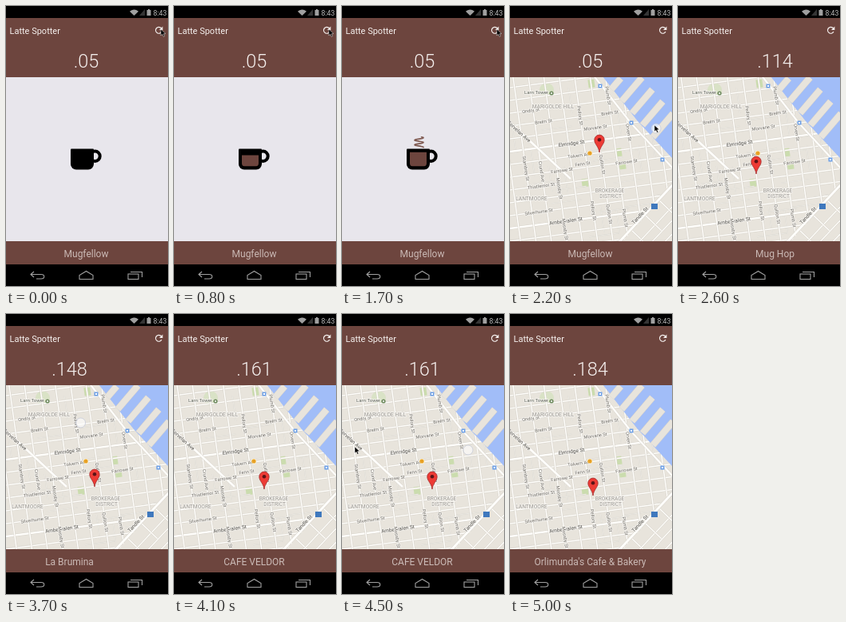
An HTML page with a canvas for the animation above (5.1 s loop, 203 by 350 pixels).

```html
<!DOCTYPE html>
<html lang="en">
<head>
<meta charset="utf-8">
<title>Coffee search</title>
<style>
html, body { margin: 0; width: 100%; height: 100%; overflow: hidden; background: #000; }
canvas { display: block; width: 203px; height: 350px; }
</style>
</head>
<body>
<canvas id="stage" width="203" height="350"></canvas>
<script>
const ctx = document.getElementById('stage').getContext('2d');
const LOOP = 5100, STEP = 100, W = 203;
const MAP_TOP = 89, MAP_BOTTOM = 294, NAV_TOP = 323;
const BROWN = '#6d453e', LAND = '#e8e4dc', PARK = '#cbdcae', GRAY = '#a0a0a0';
const MAP_AT = 1900, SLIDE_MS = 400, PRESS_MS = 100, APPROACH_MS = 200;

const shops = [
  { miles: '.05', name: 'Mugfellow', pin: [112, 183] },
  { miles: '.114', name: 'Mug Hop', pin: [98, 210] },
  { miles: '.148', name: 'La Brumina', pin: [111, 216] },
  { miles: '.161', name: 'CAFE VELDOR', pin: [113, 219] },
  { miles: '.184', name: "Orlimunda's Cafe & Bakery", pin: [104, 227] }
];

// The finger presses at (x, y) shortly before the page starts to slide.
const swipes = [
  { at: 2300, x: 183, y: 153 },
  { at: 3201, x: 156, y: 122 },
  { at: 3600, x: 123, y: 136 },
  { at: 4500, x: 158, y: 170 }
];

// One entry per grid line, with the places along it that carry its name.
const rowNames = [
  ['Ondry St', 26], ['Brelm St', 42, 125], ['Morvane St', 107], ['Elmridge St', 77],
  ['Tolvern Ave', 87], ['Farrowe St', 65, 146], ['Thistlemor St', 39], [],
  ['Silverhume St', 36], ['Ambervalen St', 70]
];
const columnNames = [
  ['Stambrey St', 203], ['Crund Ave', 207], ['Mossby St', 228, 279], [],
  ['Pellory St', 137, 256], ['Quillon St', 198, 260], ['Plumb St', 112, 265],
  ['Orven St', 158]
];

const clamp = v => Math.max(0, Math.min(1, v));
const mix = (a, b, k) => a + (b - a) * k;
const ease = v => { v = clamp(v); return v ** 3 * (10 - 15 * v + 6 * v * v); };

const rowY = (row, x) => 134 + 16 * row - 0.13 * x;
const columnX = (col, y) => 18 + 19.3 * col + 0.14 * (y - 190);

function seeded(seed) {
  return () => (seed = seed * 16807 % 2147483647) / 2147483647;
}

function box(color, x, y, w, h) {
  ctx.fillStyle = color;
  ctx.fillRect(x, y, w, h);
}

function trace(points) {
  ctx.beginPath();
  points.forEach(([x, y]) => ctx.lineTo(x, y));
}

function stroke(points, color, width) {
  trace(points);
  ctx.strokeStyle = color;
  ctx.lineWidth = width;
  ctx.stroke();
}

function shape(points, color) {
  trace(points);
  ctx.closePath();
  ctx.fillStyle = color;
  ctx.fill();
}

function disc(x, y, r, color) {
  ctx.beginPath();
  ctx.arc(x, y, r, 0, Math.PI * 2);
  ctx.fillStyle = color;
  ctx.fill();
}

function write(text, x, y, size, color, align = 'center', weight = 400) {
  ctx.font = `${weight} ${size}px Roboto, sans-serif`;
  ctx.textAlign = align;
  ctx.fillStyle = color;
  ctx.fillText(text, x, y);
}

function label(text, x, y, degrees, size = 5.8, color = '#6c6963') {
  ctx.save();
  ctx.translate(x, y);
  ctx.rotate(degrees * Math.PI / 180);
  ctx.font = `${size}px Roboto, sans-serif`;
  ctx.textAlign = 'center';
  ctx.lineWidth = 1.6;
  ctx.lineJoin = 'round';
  ctx.strokeStyle = '#f7f5f1';
  ctx.strokeText(text, 0, 2);
  ctx.fillStyle = color;
  ctx.fillText(text, 0, 2);
  ctx.restore();
}

function road(points, width) {
  stroke(points, '#d6d2ca', width + 0.9);
  stroke(points, '#fffefb', width);
}

const across = (row, x1 = -5, x2 = 210) => [[x1, rowY(row, x1)], [x2, rowY(row, x2)]];
const down = (col, y1 = 85, y2 = 300) => [[columnX(col, y1), y1], [columnX(col, y2), y2]];

function drawStreets() {
  const random = seeded(11);
  for (let i = 0; i < 22; i++) {
    const row = i / 2 + 0.5 * random(), x = 180 * random(), y = mix(100, 270, random());
    road(across(row, x, x + 38), 0.5);
    road(down(i / 2 - 0.5, y, y + 32), 0.5);
  }
  for (let row = -3; row < 13; row++) road(across(row), row === 3 || row === 9 ? 2.4 : 1.5);
  for (let col = -2; col < 10; col++) road(down(col), 1.5);
  road([[-5, 141], [76, 216]], 2.6);
}

function drawParks() {
  [[102, 97], [136, 183], [141, 199], [94, 221]].forEach(([x, y]) => {
    ctx.save();
    ctx.translate(x, y);
    ctx.rotate(-0.14);
    box(PARK, -4, -5, 8, 10);
    ctx.restore();
  });
  disc(46, 105, 9, '#d9e2c6');
}

function drawSouthEast() {
  shape([[136, 300], [208, 221], [208, 300]], LAND);
  for (let i = 0; i < 4; i++) {
    road([[153 + i * 17, 281 - i * 19], [173 + i * 17, 300 - i * 19]], 1.4);
    road([[157 + i * 16, 300], [208, 246 + i * 17]], 1.3);
  }
  road([[132, 300], [208, 219]], 3);
}

function drawWaterfront() {
  shape([[116, 88], [160, 144], [204, 191], [204, 88]], '#a1bdf8');
  for (let i = 0; i < 5; i++) {
    const x = 127 + 13 * i, y = 104 + 15 * i, length = i ? 39 : 18;
    const pier = [[x, y], [x + length * 0.65, y - length * 0.76]];
    stroke(pier, '#cfcdca', 8.8);
    stroke(pier, LAND, 8);
  }
  road([[104, 86], [152, 147], [208, 207]], 2.4);
  for (let i = 0; i < 3; i++) {
    const x = 113 + 39 * i, y = 100 + 46 * i;
    box('#6ea0e6', x - 2.5, y - 2.5, 5, 5);
    box('#fff', x - 1, y - 1, 2, 2);
  }
}

function drawMapLabels() {
  rowNames.forEach(([name, ...places], row) => {
    const main = row === 3 || row === 9;
    places.forEach(x => label(name, x, rowY(row, x), -8, main ? 6.5 : 5.8, main ? '#504e49' : undefined));
  });
  columnNames.forEach(([name, ...places], col) =>
    places.forEach(y => label(name, columnX(col, y), y, 81)));
  label('Fenn St', 91, rowY(4.7, 91), -8);
  label('Corvelan Ave', 11, 157, 42, 6.4, '#504e49');
  label('Tandle St', 163, 262, -46, 6.4, '#504e49');
  label('Larn Tower', 33, 108, 0, 6, '#555a50');
  const district = '#98958f';
  label('MARIGOLDE HILL', 54, 126, 0, 6.7, district);
  label('LANTMOORE', 27, 241, 0, 6.7, district);
  label('BROKERAGE', 125, 231, 0, 6.5, district);
  label('DISTRICT', 126, 238, 0, 6.5, district);
}

function drawMap() {
  box(LAND, 0, MAP_TOP, W, MAP_BOTTOM - MAP_TOP);
  drawParks();
  drawStreets();
  drawSouthEast();
  drawWaterfront();
  disc(52, 109, 2.6, '#6f8b5f');
  disc(52, 109, 1, '#fff');
  box('#3f78bd', 177, 247, 8, 7);
  drawMapLabels();
  disc(100, 184, 3.2, '#fff2cf');
  disc(100, 184, 2.6, '#e7a126');
}

function drawPin([x, y]) {
  const r = 6.2, head = y - 15.7;
  ctx.beginPath();
  ctx.moveTo(x, y);
  ctx.bezierCurveTo(x - 1, y - 8, x - r, y - 10, x - r, head);
  ctx.arc(x, head, r, Math.PI, 0);
  ctx.bezierCurveTo(x + r, y - 10, x + 1, y - 8, x, y);
  ctx.fillStyle = '#ed3b35';
  ctx.fill();
  ctx.strokeStyle = '#a3292a';
  ctx.lineWidth = 0.8;
  ctx.stroke();
  disc(x, head, 2.3, '#5b1417');
}

function drawSteam(amount) {
  const curl = [];
  for (let k = 0; k <= amount; k += 0.02) {
    const wave = Math.cos(k * Math.PI * 4.4);
    curl.push([96.5 + 5.5 * wave, 176.5 - 13 * k]);
  }
  ctx.lineCap = ctx.lineJoin = 'round';
  stroke(curl, '#805b52', 1.7);
  ctx.lineCap = 'butt';
  ctx.lineJoin = 'miter';
}

function drawCup(t) {
  box('#e8e6ec', 0, MAP_TOP, W, MAP_BOTTOM - MAP_TOP);
  ctx.beginPath();
  ctx.arc(111.5, 187.7, 6.2, 0, Math.PI * 2);
  ctx.strokeStyle = '#000';
  ctx.lineWidth = 4;
  ctx.stroke();
  ctx.beginPath();
  ctx.roundRect(81, 178.5, 29, 26, [1, 1, 7, 7]);
  ctx.fillStyle = '#000';
  ctx.fill();

  const level = 18 * clamp((t - 100) / 900);
  ctx.save();
  ctx.beginPath();
  ctx.roundRect(85, 182.5, 21, 18, [0, 0, 4, 4]);
  ctx.clip();
  box(BROWN, 84, 200.5 - level, 23, level);
  ctx.restore();
  if (t > 1000) drawSteam(clamp((t - 1000) / 600));
}

function drawRefresh() {
  ctx.beginPath();
  ctx.arc(191.5, 30.3, 3.9, 0.5, Math.PI * 1.78);
  ctx.strokeStyle = '#f3eeec';
  ctx.lineWidth = 1.3;
  ctx.stroke();
  shape([[196.4, 25.5], [196.4, 30], [192, 30]], '#f3eeec');
}

function drawStatusBar() {
  box('#000', 0, 0, W, 15);
  ctx.beginPath();
  ctx.moveTo(160.5, 12);
  ctx.arc(160.5, 12, 7.6, -Math.PI * 0.76, -Math.PI * 0.24);
  ctx.fillStyle = GRAY;
  ctx.fill();
  shape([[174, 4], [174, 12], [167, 12]], '#353535');
  box(GRAY, 176.5, 5, 5, 7);
  box(GRAY, 178, 4, 2, 1);
  write('8:43', 201.5, 11.5, 8.8, '#bcbcbc', 'right');
}

function drawNavBar() {
  box('#000', 0, NAV_TOP, W, 27);
  stroke([[35, 332], [31, 335.5], [35, 339]], GRAY, 1.1);
  ctx.beginPath();
  ctx.moveTo(31, 335.5);
  ctx.lineTo(44, 335.5);
  ctx.bezierCurveTo(49, 335.5, 49, 341, 44, 341);
  ctx.lineTo(38, 341);
  ctx.stroke();
  shape([[92, 341.5], [92, 336.5], [100.5, 331.5], [109, 336.5], [109, 341.5]], '#000');
  ctx.stroke();
  ctx.strokeRect(153, 335, 13, 6.5);
  stroke([[156, 332.5], [170.5, 332.5], [170.5, 339]], GRAY, 1.1);
}

function drawPage(shop, x) {
  write(shop.miles, 100.5 + x, 77, 23.5, '#f5f0ee', 'center', 300);
  write(shop.name, 100.5 + x, 313.5, 12, '#cbbab6');
}

function drawRing(x, y) {
  disc(x, y, 6, 'rgba(255,255,255,.6)');
  ctx.strokeStyle = 'rgba(190,195,215,.8)';
  ctx.lineWidth = 0.8;
  ctx.stroke();
}

// Rests on the refresh button, then darts left on each press and returns for the next.
function pointerTip(t) {
  const pressed = swipes.filter(s => t >= s.at - PRESS_MS).length;
  const last = swipes[pressed - 1], next = swipes[pressed];
  const from = last
    ? [Math.max(-20, last.x - 2 - 1.4 * (t - last.at + PRESS_MS)), last.y - 4]
    : [194, 29];
  if (!next) return from;
  const k = clamp(1 - (next.at - PRESS_MS - t) / APPROACH_MS);
  return [mix(from[0], next.x - 2, k), mix(from[1], next.y - 4, k)];
}

function drawPointer([x, y]) {
  const arrow = [[0, 0], [0, 8], [1.9, 6.3], [3.3, 9.3], [4.7, 8.6], [3.4, 5.8], [6, 5.6]];
  shape(arrow.map(([dx, dy]) => [x + dx, y + dy]), '#000');
  ctx.strokeStyle = 'rgba(255,255,255,.75)';
  ctx.lineWidth = 0.6;
  ctx.stroke();
}

function draw(t) {
  const page = Math.max(0, swipes.filter(s => t >= s.at).length - 1);
  const slide = ease((t - swipes[page].at) / SLIDE_MS);

  if (t < MAP_AT) drawCup(t);
  else {
    drawMap();
    drawPin(shops[slide < 0.35 ? page : page + 1].pin);
  }

  box(BROWN, 0, 15, W, MAP_TOP - 15);
  box(BROWN, 0, MAP_BOTTOM, W, NAV_TOP - MAP_BOTTOM);
  write('Latte Spotter', 4.5, 35, 11, '#f5f0ee', 'left');
  drawRefresh();
  drawPage(shops[page], -W * slide);
  drawPage(shops[page + 1], W * (1 - slide));
  drawStatusBar();
  drawNavBar();

  const touch = swipes.find(s => t >= s.at - PRESS_MS && t < s.at + 300);
  if (touch) drawRing(touch.x - 1.4 * W * ease((t - touch.at) / SLIDE_MS), touch.y);
  drawPointer(pointerTip(t));
}

const start = performance.now();
let shown = -1;
function tick() {
  const t = Math.floor((performance.now() - start) % LOOP / STEP) * STEP;
  if (t !== shown) draw(shown = t);
  requestAnimationFrame(tick);
}
tick();
</script>
</body>
</html>
```
